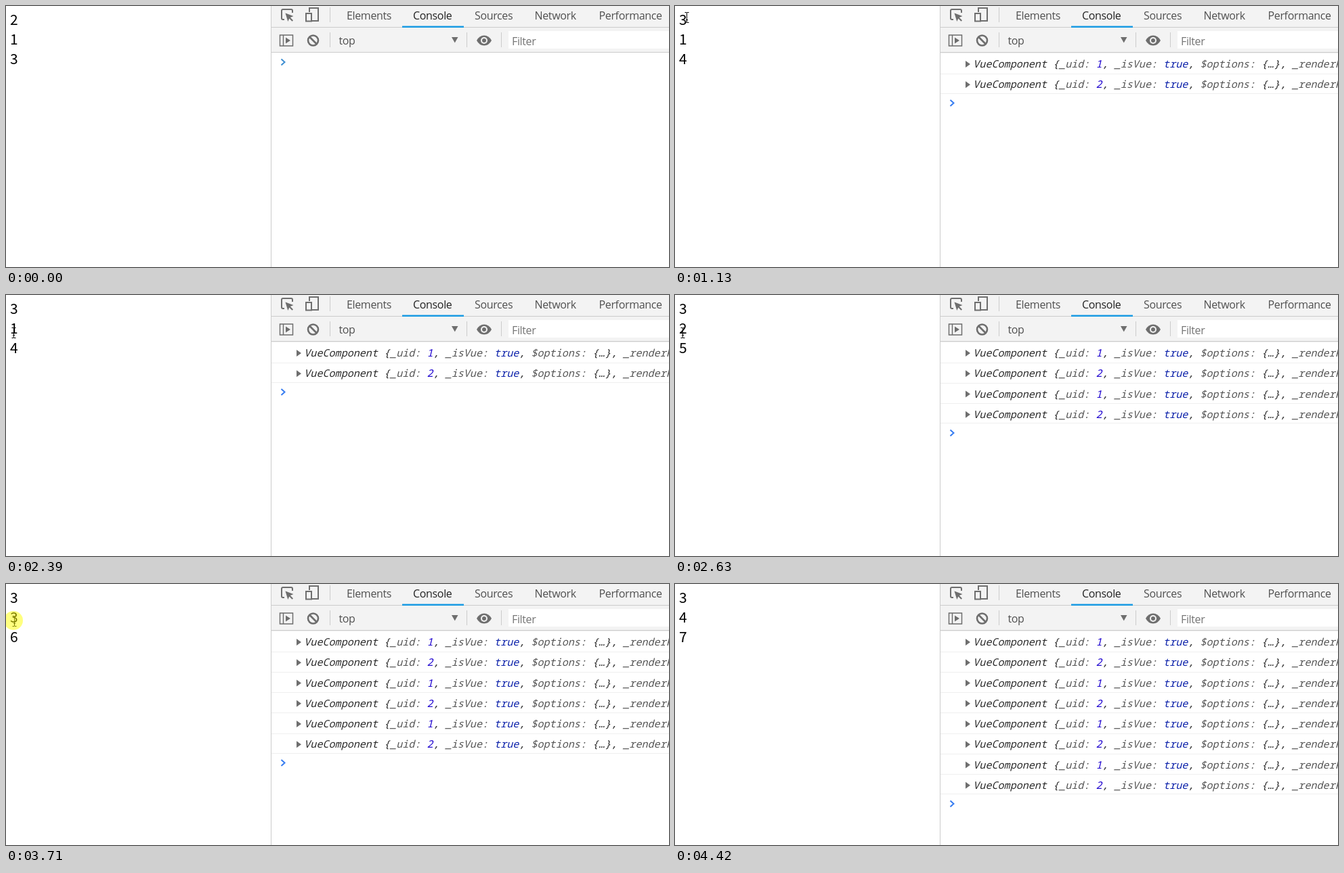
Recreate the animation shown at these times as an HTML page. Size 979 by 386 pixels, loop 5190 ms.

```html
<!DOCTYPE html>
<html lang="en">
<head>
<meta charset="utf-8">
<title>Counter and console</title>
<style>
  html, body { margin: 0; width: 100%; height: 100%; overflow: hidden; background: #fff; }
  svg { display: block; width: 979px; height: 386px; }
  text { white-space: pre; }
  .ui { font: 16px "Open Sans", "Noto Sans", sans-serif; letter-spacing: -.35px; fill: #505050; }
  .ui .active { fill: #222; }
  .ui .hint { fill: #757575; }
  .digits { font: 21px "Noto Sans CJK SC", "Noto Sans CJK JP", "Noto Sans", sans-serif; fill: #000; }
  .log { font: italic 15.1px "Noto Sans Mono", "DejaVu Sans Mono", monospace; fill: #2b2b2b; }
  .key { fill: #565656; }
  .num { fill: #1c00cf; }
  .bool { fill: #0d22aa; }
  .icon { fill: none; stroke: #6e6e6e; stroke-width: 2; }
  .thin { stroke-width: 1.5; }
  .thick { stroke-width: 2.6; }
  .solid { fill: #6e6e6e; }
  .rule { fill: #ccc; }
  .line { fill: #efefef; }
</style>
</head>
<body>
<svg viewBox="0 0 979 386">
  <g class="digits">
    <text id="a" x="6" y="28">2</text>
    <text id="b" x="6" y="57">1</text>
    <text id="sum" x="6" y="86">3</text>
  </g>

  <g id="rows"></g>
  <rect id="end" class="line" x="392" width="587" height="1"/>
  <path id="prompt" d="M406.500 -4.500l5 4.500-5 4.500" fill="none" stroke-width="2"/>

  <rect x="392" width="587" height="69" fill="#f3f3f3"/>
  <rect x="742" y="37" width="237" height="26" fill="#fff"/>
  <g class="rule">
    <rect x="391" width="1" height="386"/>
    <rect x="392" y="31" width="587" height="1"/>
    <rect x="392" y="68" width="587" height="1"/>
    <rect x="478" y="2" width="1" height="22"/>
    <rect x="478" y="39" width="1" height="22"/>
    <rect x="680" y="39" width="1" height="22"/>
    <rect x="731" y="39" width="1" height="22"/>
  </g>
  <rect x="585" y="29.500" width="91" height="2.500" fill="#1a9be3"/>

  <g class="ui">
    <text x="503" y="20">Elements</text>
    <text class="active" x="601" y="20">Console</text>
    <text x="692" y="20">Sources</text>
    <text x="780.500" y="20">Network</text>
    <text x="875.500" y="20">Performance</text>
    <text x="491.500" y="57">top</text>
    <text class="hint" x="747" y="58">Filter</text>
  </g>

  <!-- inspect, device, sidebar, clear, menu, eye -->
  <path class="icon" d="M411 20h-2q-2 0-2-2V7q0-2 2-2h12q2 0 2 2v3"/>
  <path class="solid" d="M412.500 10.500l12 4.500-4.700 2 4.200 4.200-1.500 1.500-4.200-4.200-2 4.500z"/>
  <path class="icon" d="M448 9V3h13v19h-10M443 11h8v11.500h-8z"/>
  <path class="icon thin" d="M404.500 43h19v16h-19zM409.500 43v16"/>
  <path class="solid" d="M413 46.500l7 4.500-7 4.500z"/>
  <path class="icon thick" d="M448.500 46l10 10"/>
  <circle class="icon thick" cx="453.500" cy="51" r="7.500"/>
  <path class="solid" d="M658 46h9.500l-4.750 8.500z"/>
  <path class="solid" d="M695 51q4-7.500 11-7.500t11 7.500q-4 7.500-11 7.500t-11-7.500z"/>
  <circle cx="706" cy="51" r="5" fill="#f3f3f3"/>
  <circle class="solid" cx="706" cy="51" r="3"/>

  <path id="beam" d="M-3 -7.500h2.500l.5 .5 .5 -.5h2.500M0 -7v14M-3 7.500h2.500l.5 -.5 .5 .5h2.500M-1.500 3.500h3" fill="none" stroke="#000"/>
  <path id="arrow" d="M.5 .5v16l3.700-3.500 2.600 5.500 2.300-1-2.500-5.500h5z" fill="#fff" stroke="#000"/>
  <circle id="halo" r="14" fill="#ff0" fill-opacity=".5"/>
</svg>

<script>
const LOOP = 5190, STEP = 75, PITCH = 30.25;
const $ = id => document.getElementById(id);

const clicks = [
  { press: 1060, log: 1130, release: 1130 },
  { press: 2470, log: 2550, release: 2630 },
  { press: 3190, log: 3240, release: 3240 },
  { press: 3710, log: 3870, release: 3940 },
];

// Pointer keys are [time, x, y]
const linear = k => k;
const smooth = k => k * k * (3 - 2 * k);
const tracks = [
  { shape: 'arrow', until: 500, ease: smooth, keys: [[70, 708, 331], [445, 26, 46]] },
  { shape: 'beam', until: 4110, ease: linear, keys: [
    [730, 5, 28], [880, 17, 17], [1140, 17, 17], [1450, 11, 19],
    [1870, 9.5, 19], [2240, 10, 70], [2380, 11.5, 56], [4110, 12.9, 54]] },
  { shape: 'arrow', until: 4420, ease: smooth, keys: [[4110, 45, 68], [4335, 714, 341]] },
];

function locate({ keys, ease }, t) {
  const start = keys[0][0];
  const time = start + Math.floor((t - start) / STEP) * STEP;
  const i = Math.max(1, keys.findIndex(key => key[0] >= time));
  const [t0, x0, y0] = keys[i - 1], [t1, x1, y1] = keys[i];
  const k = ease((time - t0) / (t1 - t0));
  return [Math.floor(x0 + (x1 - x0) * k) + .5, Math.round(y0 + (y1 - y0) * k)];
}

const span = (cls, s) => `<tspan class="${cls}">${s}</tspan>`;

function row(i) {
  const y = 91 + i * PITCH;
  return `<g>
    <rect class="line" x="392" y="${Math.floor(y - 21.25)}" width="587" height="1"/>
    <path class="solid" d="M429 ${y - 10}l7 5-7 5z"/>
    <text class="log" x="440.3" y="${y}">VueComponent {${span('key', '_uid: ')}${span('num', 1 + i % 2)}, ${
      span('key', '_isVue: ')}${span('bool', 'true')}, ${span('key', '$options: ')}{…}, ${span('key', '_renderProxy')}</text></g>`;
}

$('rows').innerHTML = Array.from({ length: 2 * clicks.length }, (_, i) => row(i)).join('');
const rows = [...$('rows').children];

const show = (el, on) => el.setAttribute('visibility', on ? 'visible' : 'hidden');
const place = (el, x, y) => el.setAttribute('transform', `translate(${x} ${y})`);

function draw(t) {
  const n = clicks.filter(c => c.log <= t).length;
  const a = n ? 3 : 2, b = Math.max(1, n);
  $('a').textContent = a;
  $('b').textContent = b;
  $('sum').textContent = a + b;

  const promptY = 83 + 2 * n * PITCH;
  rows.forEach((el, i) => show(el, i < 2 * n));
  place($('end'), 0, Math.floor(promptY - 14.25));
  place($('prompt'), 0, promptY);
  $('prompt').setAttribute('stroke', n ? '#367cf1' : '#3f8fd2');

  const track = tracks.find(({ keys, until }) => t >= keys[0][0] && t < until);
  const [x, y] = track ? locate(track, t) : [0, 0];
  for (const id of ['beam', 'arrow']) {
    show($(id), track?.shape === id);
    place($(id), x, y);
  }
  show($('halo'), clicks.some(c => t >= c.press && t < c.release));
  place($('halo'), x - 1.5, y - 1);
}

let start;
function tick(now) {
  start ??= now;
  draw((now - start) % LOOP);
  requestAnimationFrame(tick);
}
draw(0);
requestAnimationFrame(tick);
</script>
</body>
</html>
```
